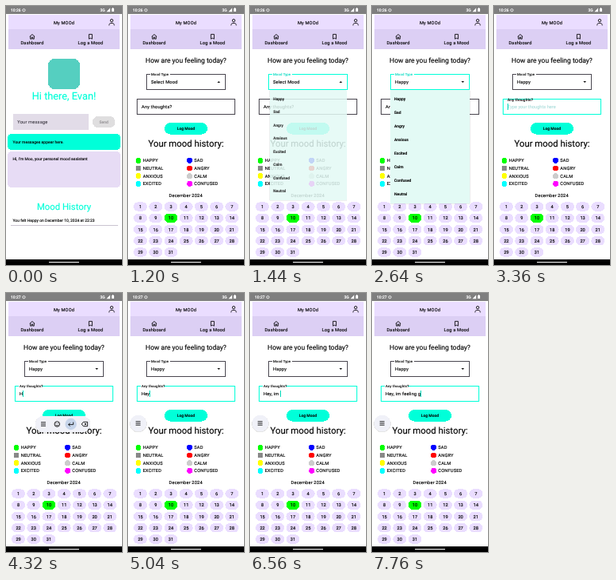
Recreate the animation shown at these times as an HTML page. Size 146 by 324 pixels, loop 8000 ms.

```html
<!DOCTYPE html>
<html lang="en">
<head>
<meta charset="utf-8">
<title>Mood diary</title>
<style>
html, body { margin: 0; width: 100%; height: 100%; overflow: hidden; background: #fff; }
svg { display: block; width: 100vw; height: 100vh; }
rect, .dot { shape-rendering: crispEdges; }
text {
  font-family: Roboto, "Noto Sans", sans-serif; text-rendering: geometricPrecision; white-space: pre;
  fill: currentColor; stroke: currentColor; stroke-width: 0.14;
}
</style>
</head>
<body>
<svg id="stage" viewBox="0 0 146 324"></svg>
<script>
const LOOP = 8000, TICK = 80;
const TEAL = '#00ffd9', LILAC = '#eaddff', INK = '#000', EDGE = '#4a4750';
const BODY = 5.68, SMALL = 4.97, LABEL = 4.26;

const set = (node, attrs) => {
  for (const k in attrs) node.setAttribute(k, attrs[k]);
  return node;
};
const add = (parent, tag, attrs) =>
  parent.appendChild(set(document.createElementNS('http://www.w3.org/2000/svg', tag), attrs));
const group = (parent, attrs = {}) => add(parent, 'g', attrs);
const box = (parent, x, y, width, height, fill, rx = 0, more = {}) =>
  add(parent, 'rect', { x, y, width, height, fill, rx, ...more });
const label = (parent, str, x, y, size, more = {}) => {
  const t = add(parent, 'text', { x, y, 'font-size': size, color: INK, ...more });
  t.textContent = str;
  return t;
};
const mid = { 'text-anchor': 'middle' };
const spaced = { 'letter-spacing': 0.178 };
const icon = (parent, d, more = {}) =>
  add(parent, 'path', { d, fill: 'none', stroke: INK, 'stroke-width': 0.85, 'stroke-linejoin': 'round', ...more });
const ring = (parent, cx, cy, r, stroke = INK) =>
  add(parent, 'circle', { cx, cy, r, fill: 'none', stroke, 'stroke-width': 0.85 });
const show = (node, on) => set(node, { opacity: +on });

// value of the last row whose time has been reached
const at = (rows, t) => {
  let hit = rows[0];
  for (const r of rows) if (r[0] <= t) hit = r;
  return hit;
};

const svg = document.getElementById('stage');
box(svg, 0, 0, 146, 324, '#fff');

// status bar
box(svg, 0, 0, 146, 10, '#7f7f7f');
const white = { color: '#fff', 'font-weight': 500 };
const clock = label(svg, '', 6, 7, 5, white);
ring(svg, 22.5, 5.2, 1.6, '#fff');
label(svg, '3G', 118.5, 7, 5, white);
icon(svg, 'M126.5 7.2h4.6V2.6z', { fill: '#fff', stroke: 'none' });
box(svg, 133, 3, 3, 4, '#fff');
box(svg, 134, 2, 1, 1, '#fff');

// header and tabs
box(svg, 3, 11, 140, 18, LILAC);
box(svg, 3, 29, 140, 25, '#dccff4');
label(svg, 'My MOOd', 73, 22.5, BODY, { ...mid, ...spaced });
ring(svg, 133, 18.2, 1.7);
icon(svg, 'M129.8 24.4v-.8c0-1.6 1.6-2.2 3.2-2.2s3.2.6 3.2 2.2v.8');
icon(svg, 'M29.8 38.3L33 35.5l3.2 2.8M30.7 37.8v3.4h1.6v-2.1h1.4v2.1h1.6v-3.4');
icon(svg, 'M104.4 35.4h4v5.8l-2-1-2 1z');
label(svg, 'Dashboard', 33, 48, BODY, { ...mid, ...spaced });
label(svg, 'Log a Mood', 106.5, 48, BODY, { ...mid, ...spaced });

// dashboard
const home = group(svg);
box(home, 53, 66, 40, 38, '#55cfc0', 8);
label(home, 'Hi there, Evan!', 73, 117.4, 12.78, { ...mid, color: TEAL });
box(home, 9, 135, 95, 20, '#e2dce8', 1.4);
box(home, 9, 155, 95, 0.4, EDGE);
label(home, 'Your message', 14.3, 147.2, BODY, { ...spaced, color: '#49454f' });
box(home, 109, 138, 28.5, 14.3, '#dfdedf', 7.1);
label(home, 'Send', 123.2, 146.9, SMALL, { ...mid, color: '#9b999c', 'font-weight': 500 });
box(home, 2, 160, 142, 20, TEAL, 5);
label(home, 'Your messages appear here.', 8.5, 171.8, SMALL, { 'letter-spacing': 0.06 });
box(home, 2, 182, 142, 45, '#e7dcf5', 5);
label(home, "Hi, I'm Moo, your personal mood assistant", 8.5, 193, SMALL, { 'letter-spacing': 0.05 });
label(home, 'Mood History', 73, 255, 11.36, { ...mid, color: TEAL });
label(home, 'You felt Happy on December 10, 2024 at 22:23', 8.5, 269.6, SMALL, { 'letter-spacing': 0.03 });
box(home, 5.5, 274, 135, 0.5, '#cac4d0');

// mood log
const log = group(svg);
label(log, 'How are you feeling today?', 73, 71, 8.52, mid);

const outline = (x, y, w, h, gapX, gapW) => ({
  frame: box(log, x, y, w, h, 'none', 1.4, { stroke: EDGE, 'stroke-width': 1 }),
  gap: box(log, gapX, y - 1.5, gapW, 3, '#fff')
});
const moodBox = outline(23.5, 85.5, 99, 19, 28, 25);
const moodLabel = label(log, 'Mood Type', 29, 86.6, LABEL, { 'letter-spacing': 0.14 });
const moodValue = label(log, '', 29, 97.2, BODY, spaced);
const arrow = add(log, 'path', { d: 'M112.4 94h3.6l-1.8 1.9z', fill: INK });

const noteBox = outline(11.5, 116.5, 123, 19, 16, 28.5);
const noteLabel = label(log, 'Any thoughts?', 17, 128.2, BODY, spaced);
const hint = label(log, 'Type your thoughts here', 17, 128.4, BODY, { color: '#94d3d0' });
const note = label(log, '', 17, 128.4, BODY, spaced);
const caret = box(log, 17, 122, 1, 8, '#00dcbc');

box(log, 46, 146, 54, 14.5, TEAL, 7.2);
label(log, 'Log Mood', 73, 154.9, SMALL, { ...mid, 'font-weight': 500 });
label(log, 'Your mood history:', 73, 176, 11.36, mid);

const legend = [
  ['HAPPY', '#0f0'], ['SAD', '#00f'], ['NEUTRAL', '#888'], ['ANGRY', '#f00'],
  ['ANXIOUS', '#ff0'], ['CALM', '#ccc'], ['EXCITED', '#0ff'], ['CONFUSED', '#f0f']
];
legend.forEach(([name, fill], i) => {
  const x = 13 + (i % 2) * 64.6, y = 193.3 + (i >> 1) * 9.7;
  add(log, 'circle', { cx: x, cy: y, r: 3.5, fill, class: 'dot' });
  label(log, name, x + 5.7, y + 2, BODY, spaced);
});

label(log, 'December 2024', 72.7, 239.3, BODY, { ...mid, ...spaced });
for (let d = 0; d < 31; d++) {
  const x = 15.6 + (d % 7) * 19.2, y = 251 + Math.floor(d / 7) * 14.25;
  box(log, x - 8.5, y - 5.7, 17, 11.4, d === 9 ? '#0f0' : LILAC, 5.7);
  label(log, d + 1, x, y + 2, BODY, mid);
}

// drop-down list
const menu = group(log);
box(menu, 22.6, 105.6, 101.2, 142.4, '#000', 1.4, { opacity: 0.07 });
box(menu, 23.2, 105, 100, 142, '#e3faf5', 1.4);
['Happy', 'Sad', 'Angry', 'Anxious', 'Excited', 'Calm', 'Confused', 'Neutral'].forEach((name, i) =>
  label(menu, name, 28, 118.2 + i * 17.04, SMALL, { 'font-weight': 500 }));

// floating keyboard bar
const bar = group(svg);
const shade = box(bar, 0, 0, 0, 21.6, '#000', 10.8, { opacity: 0.1 });
const pill = box(bar, 0, 0, 0, 20.6, '#f0f1f8', 10.3);
const keys = [0, 1, 2, 3].map(() => group(bar));
icon(keys[0], 'M-3 -2.2H3M-3 0H3M-3 2.2H3');
ring(keys[1], 0, 0, 3.3);
icon(keys[1], 'M-1.8 .8a2 2 0 0 0 3.6 0M-1.3 -1.6v1M1.3 -1.6v1');
add(keys[2], 'circle', { r: 7.2, fill: '#c6d4ea' });
icon(keys[2], 'M3 -2.4V.6H-3M-1 -1.4L-3 .6L-1 2.6');
icon(keys[3], 'M-3.8 0L-1.6 -2.7H3.6V2.7H-1.6ZM-.3 -1.2L2.1 1.2M2.1 -1.2L-.3 1.2');

// time, left, middle height, width
const barPath = [
  [3920, 37, 303, 69], [4000, 37, 200, 69], [4080, 37, 164, 69],
  [4400, 37, 164, 64], [4560, 20, 170, 40], [4640, 0.5, 185, 20.6],
  [4720, 2.7, 181, 20.6], [4880, 2.7, 175, 20.6], [4960, 2.7, 167, 20.6], [5040, 2.7, 163, 20.6]
];

const phrase = 'Hey, im feeling g';
const strokes = [4240, 4560, 4880, 5200, 5440, 6240, 6480, 6560, 6720, 6880,
  7120, 7200, 7360, 7440, 7520, 7680, 7760];
const pen = document.createElement('canvas').getContext('2d');
pen.font = '100px Roboto, "Noto Sans", sans-serif';
const widthOf = s => pen.measureText(s).width * BODY / 100 + s.length * 0.178;

const focus = (field, on) => set(field.frame, { stroke: on ? TEAL : EDGE });

function drawMood(t) {
  const active = t >= 1360 && t < 3360;
  focus(moodBox, active);
  set(moodLabel, { color: active ? '#00d9c0' : INK });
  moodValue.textContent = t < 2640 ? 'Select Mood' : 'Happy';
  set(arrow, { transform: t >= 1200 && t < 2640 ? 'rotate(180 114.2 95)' : '' });
  const [, alpha, scale] = at([
    [0, 0, 1], [1360, 0.4, 0.88], [1440, 0.85, 0.97], [1520, 1, 1], [2720, 0.3, 1], [2800, 0, 1]
  ], t);
  set(menu, { opacity: alpha, transform: `translate(73.2 105) scale(${scale}) translate(-73.2 -105)` });
}

function drawNote(t) {
  const active = t >= 3360;
  focus(noteBox, active);
  show(noteBox.gap, t >= 3440);
  const [, y, size] = at([[0, 128.2, BODY], [3360, 119.4, 4.7], [3440, 118, LABEL]], t);
  set(noteLabel, { y, 'font-size': size });

  const count = strokes.filter(s => s <= t).length;
  const typed = phrase.slice(0, count);
  note.textContent = typed;
  set(hint, { opacity: count || !active ? 0 : at([[3360, 0.75], [3440, 1]], t)[1] });
  set(caret, { x: 17 + widthOf(typed) });
  show(caret, active && !(t >= 3760 && t < 4240) && !(t >= 5840 && t < 6480));
}

function drawBar(t) {
  show(bar, t >= barPath[0][0]);
  const [, x, y, w] = at(barPath, t);
  set(shade, { x: x - 0.5, y: y - 10.1, width: w + 1 });
  set(pill, { x, y: y - 10.3, width: w });
  keys.forEach((key, i) => {
    set(key, { transform: `translate(${x + 10 + i * (w - 17) / 3} ${y})` });
    show(key, i === 0 || w > 60);
  });
}

function draw(ms) {
  const t = Math.floor((ms % LOOP) / TICK) * TICK;
  clock.textContent = t < 3600 ? '10:26' : '10:27';
  set(home, { opacity: at([[0, 1], [160, 0.45], [240, 0]], t)[1] });
  set(log, { opacity: at([[0, 0], [160, 0.55], [240, 1]], t)[1] });
  drawMood(t);
  drawNote(t);
  drawBar(t);
}

// navigation strip
box(svg, 0, 317, 146, 7, '#000');
box(svg, 54, 320, 38, 1, '#fff');

const start = performance.now();
function loop() {
  draw(performance.now() - start);
  requestAnimationFrame(loop);
}
loop();
</script>
</body>
</html>
```
